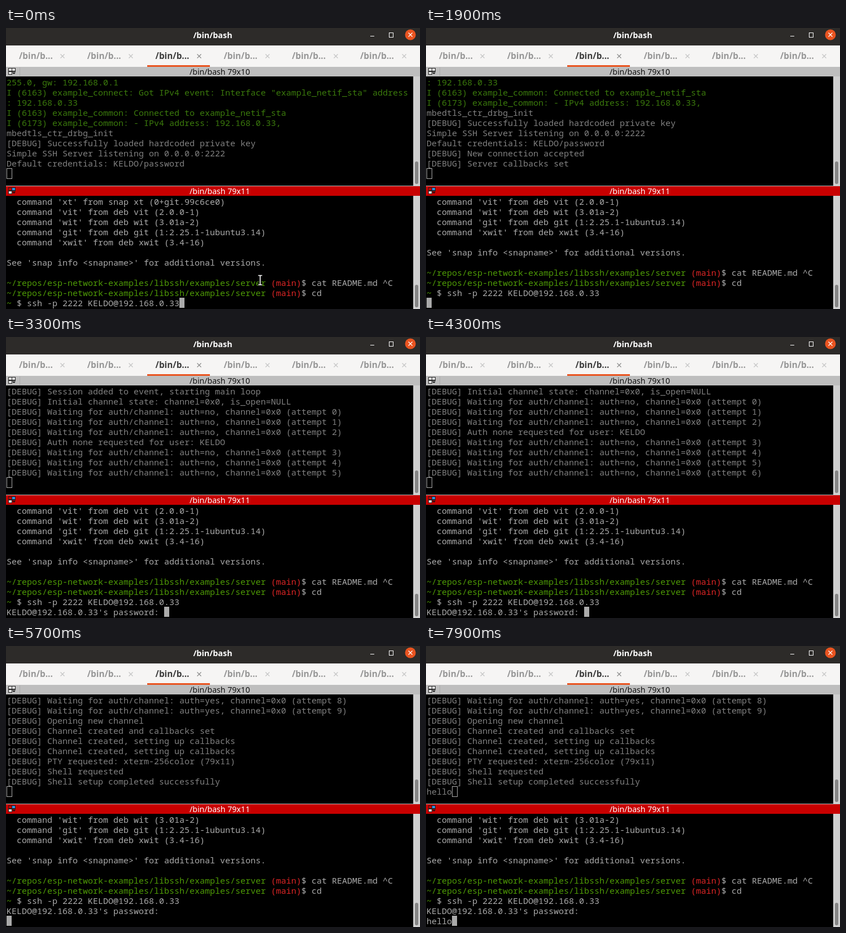
Animation of 733x499 px, one loop 8 s. Source, as an HTML page with a canvas:

```html
<!DOCTYPE html>
<html lang="en">
<head>
<meta charset="utf-8">
<title>/bin/bash</title>
<style>
  html, body { margin: 0; width: 100%; height: 100%; overflow: hidden; background: #000; }
  canvas { display: block; }
</style>
</head>
<body>
<canvas id="stage" width="733" height="499"></canvas>
<script>
const ctx = document.getElementById('stage').getContext('2d');
const LOOP = 8000, COL = 9, ROW = 18;
const MONO = '15px "Noto Sans Mono", monospace';
const UI = '"Noto Sans", sans-serif';
const GREY = '#aaaaaa', GREEN = '#4e9a06', RED = '#dc2525';
const DIM = '#808080', DIM_GREEN = '#3b7a0c';
const USER = 'KELDO', HOST = '192.168.0.33';

const debug = text => '[DEBUG] ' + text;
const waiting = n =>
  debug(`Waiting for auth/channel: auth=${n < 8 ? 'no' : 'yes'}, channel=0x0 (attempt ${n})`);

const serverLog = [
  '255.0, gw: 192.168.0.1',
  'I (6163) example_connect: Got IPv4 event: Interface "example_netif_sta" address',
  ': ' + HOST,
  'I (6163) example_common: Connected to example_netif_sta',
  `I (6173) example_common: - IPv4 address: ${HOST},`,
  'mbedtls_ctr_drbg_init',
  debug('Successfully loaded hardcoded private key'),
  'Simple SSH Server listening on 0.0.0.0:2222',
  `Default credentials: ${USER}/password`,
  debug('New connection accepted'),
  debug('Server callbacks set'),
  debug('Authentication methods set'),
  debug('Session added to event, starting main loop'),
  debug('Initial channel state: channel=0x0, is_open=NULL'),
  ...[0, 1, 2].map(waiting),
  debug('Auth none requested for user: ' + USER),
  ...[3, 4, 5, 6, 7, 8, 9].map(waiting),
  debug('Opening new channel'),
  debug('Channel created and callbacks set'),
  debug('Channel created, setting up callbacks'),
  debug('Channel created, setting up callbacks'),
  debug('PTY requested: xterm-256color (79x11)'),
  debug('Shell requested'),
  debug('Shell setup completed successfully'),
];
const GREEN_LINES = 5;

// A client line is a list of [text, colour] runs.
const plain = text => [[text, GREY]];
const prompt = command => [
  ['~/repos/esp-network-examples/libssh/examples/server ', GREEN],
  ['(main)', RED],
  ['$ ' + command, GREY],
];
const clientLog = [
  "  command 'xt' from snap xt (0+git.99c6ce0)",
  "  command 'vit' from deb vit (2.0.0-1)",
  "  command 'wit' from deb wit (3.01a-2)",
  "  command 'git' from deb git (1:2.25.1-1ubuntu3.14)",
  "  command 'xwit' from deb xwit (3.4-16)",
  '',
  "See 'snap info <snapname>' for additional versions.",
  '',
].map(plain).concat([
  prompt('cat README.md ^C'),
  prompt('cd'),
  [['~', GREEN], [` $ ssh -p 2222 ${USER}@${HOST}`, GREY]],
]);

// [time, number of server lines printed so far]
const printed = [[0, 9], [900, 11], [2200, 12], [2400, 20], [3300, 21],
                 [4300, 22], [5300, 23], [5400, 24], [5700, 32]];
const blinks = [200, 900, 1300, 1900, 2500, 3100, 5900, 6500];
const keys = [7000, 7400, 7500, 7900];

const passed = (times, t) => times.filter(time => t >= time).length;
const typed = (t, first) => 'hello'.slice(0, passed([first, ...keys], t));

function rect(x, y, w, h, color) {
  ctx.fillStyle = color;
  ctx.fillRect(x, y, w, h);
}

function text(string, x, y, color, font = MONO, align = 'left') {
  ctx.font = font;
  ctx.fillStyle = color;
  ctx.textAlign = align;
  ctx.fillText(string, x, y);
}

function path(points, color, width = 1) {
  ctx.beginPath();
  points.forEach(([x, y], i) => i % 2 ? ctx.lineTo(x, y) : ctx.moveTo(x, y));
  ctx.strokeStyle = color;
  ctx.lineWidth = width;
  ctx.stroke();
}

function cross(x, y, r, color, width) {
  path([[x - r, y - r], [x + r, y + r], [x - r, y + r], [x + r, y - r]], color, width);
}

function box(x, y, w, h, color) {
  ctx.strokeStyle = color;
  ctx.lineWidth = 1;
  ctx.strokeRect(x + .5, y + .5, w - 1, h - 1);
}

function thumb(y, h) {
  ctx.fillStyle = '#858585';
  ctx.beginPath();
  ctx.roundRect(724, y, 6, h, 3);
  ctx.fill();
}

function arrow(y) {
  ctx.fillStyle = '#111';
  ctx.beginPath();
  ctx.moveTo(11, y);
  ctx.lineTo(17, y);
  ctx.lineTo(14, y + 3);
  ctx.fill();
}

function drawWindow() {
  rect(0, 0, 733, 31, '#2d2b29');
  text('/bin/bash', 366, 18, '#fff', 'bold 14.4px ' + UI, 'center');
  rect(645, 14, 7, 1, '#fff');
  box(678, 8, 8, 9, '#fff');
  ctx.fillStyle = '#e95420';
  ctx.beginPath();
  ctx.arc(716, 12, 9.5, 0, 7);
  ctx.fill();
  cross(716, 12, 3.5, '#fff', 1.2);

  rect(0, 31, 733, 38, '#f6f5f4');
  for (let i = 0; i < 6; i++) {
    const active = i === 2;
    text('/bin/b...', 23 + 120.8 * i, 55, active ? '#3d3d3d' : '#979797', 'bold 15.3px ' + UI);
    cross(100 + 121 * i, 50, 3.5, active ? '#8a8a8a' : '#c4c4c4', 1.2);
  }
  rect(250, 66, 111, 3, '#e95420');

  rect(0, 69, 733, 17, '#bebebe');
  rect(24, 70, 1, 15, '#aaa');
  text('/bin/bash 79x10', 378.5, 83, '#111', '14.1px ' + UI, 'center');
  rect(4, 71, 13, 12, '#222');
  for (const [x, y] of [[5, 72], [11, 72], [5, 78]]) rect(x, y, 5, 4, '#e4e4e4');
  rect(11, 78, 6, 5, '#bebebe');
  arrow(79);

  rect(0, 280, 733, 1, '#bebebe');
  rect(0, 281, 733, 17, '#c80000');
  text('/bin/bash 79x11', 378.5, 295, '#fff', '14.1px ' + UI, 'center');
  rect(4, 283, 13, 12, '#222');
  rect(5, 284, 5, 4, '#c80000');
  rect(11, 284, 5, 4, '#2f8fe0');
  rect(5, 290, 5, 4, '#ddd');
  rect(11, 290, 6, 5, '#c80000');
  arrow(291);

  rect(721, 86, 12, 194, '#d0d0d0');
  rect(721, 298, 12, 201, '#d0d0d0');
  thumb(237, 40);
  thumb(456, 40);
}

function drawServer(t) {
  const end = printed.filter(([time]) => t >= time).pop()[1];
  for (let row = 0; row < 9; row++) {
    const i = end - 9 + row;
    text(serverLog[i], 1, 102 + ROW * row, i < GREEN_LINES ? DIM_GREEN : DIM);
  }
  const input = typed(t, 6700);
  text(input, 1, 264, DIM);
  box(1 + COL * input.length, 249, 10, 19, GREY);
}

function drawClient(t) {
  const lines = [...clientLog];
  if (t >= 900) lines.push(plain(t < 2400 ? '' : `${USER}@${HOST}'s password: `));
  if (t >= 5300) lines.push(plain(typed(t, 6800)));
  let col;
  lines.slice(-11).forEach((runs, row) => {
    col = 0;
    for (const [string, color] of runs) {
      text(string, 1 + COL * col, 314 + ROW * row, color);
      col += string.length;
    }
  });
  if (passed(blinks, t) % 2 === 0) rect(1 + COL * col, 479, COL, ROW, GREY);
}

function drawPointer() {
  const beam = [[450, 440], [450, 456], [446.5, 439.5], [453.5, 439.5], [446.5, 456], [453.5, 456]];
  path(beam, '#000', 4);
  path(beam, '#fff', 1.6);
}

function frame() {
  const t = performance.now() % LOOP;
  rect(0, 0, 733, 499, '#000');
  drawWindow();
  drawServer(t);
  drawClient(t);
  if (t < 900) drawPointer();
  requestAnimationFrame(frame);
}
frame();
</script>
</body>
</html>
```
